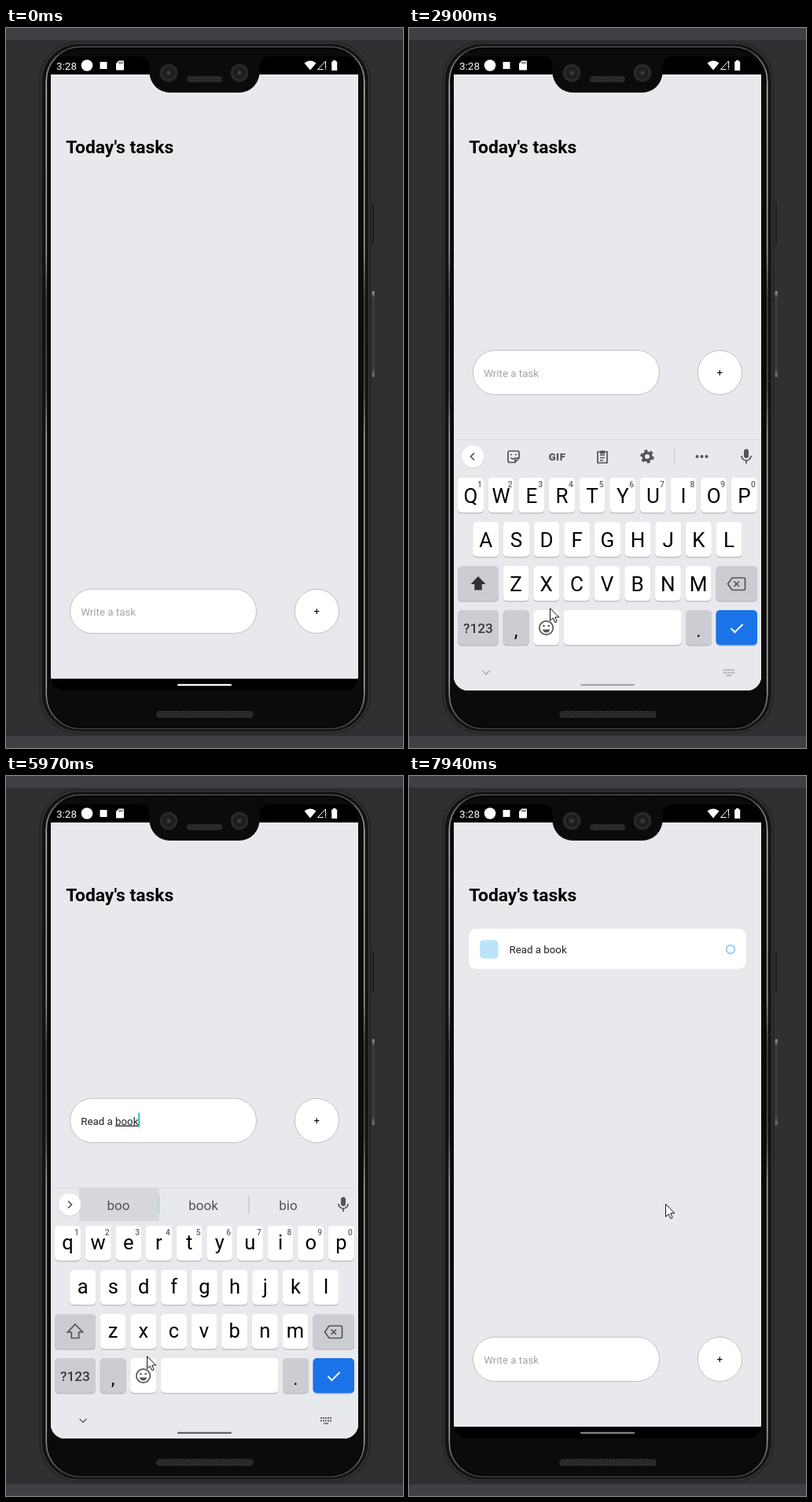
An HTML page for the animation above (8 s loop, 505 by 914 pixels).

```html
<!DOCTYPE html>
<html lang="en">
<head>
<meta charset="utf-8">
<title>Task list</title>
<style>
html, body { margin: 0; width: 505px; height: 914px; overflow: hidden; background: #2f3032; }
svg { display: block; font-family: Roboto, sans-serif; }
text { white-space: pre; }
.mid { text-anchor: middle; }
.icon { fill: none; stroke: #50545a; stroke-width: 1.7; }
</style>
</head>
<body>
<svg width="505" height="914" viewBox="0 0 505 914">
  <defs>
    <linearGradient id="metal" x2="0" y2="1">
      <stop offset="0" stop-color="#4a4b4d"/><stop offset=".06" stop-color="#b0b0b0"/>
      <stop offset=".3" stop-color="#9a9a9a"/><stop offset=".37" stop-color="#444"/>
      <stop offset=".5" stop-color="#505050"/><stop offset=".57" stop-color="#a0a0a0"/>
      <stop offset=".93" stop-color="#a4a4a4"/><stop offset="1" stop-color="#3c3c3c"/>
    </linearGradient>
    <linearGradient id="knob" x2="0" y2="1">
      <stop offset="0" stop-color="#999"/><stop offset=".08" stop-color="#3a3a3c"/>
      <stop offset=".9" stop-color="#3a3a3c"/><stop offset="1" stop-color="#777"/>
    </linearGradient>
    <radialGradient id="lens">
      <stop offset="0" stop-color="#4a4c4e"/><stop offset=".25" stop-color="#242627"/>
      <stop offset=".55" stop-color="#17191a"/><stop offset=".8" stop-color="#2b2d2e"/>
      <stop offset="1" stop-color="#1f2021"/>
    </radialGradient>
    <pattern id="mesh" width="3" height="3" patternUnits="userSpaceOnUse">
      <rect width="3" height="3" fill="#1c1c1c"/><path d="M0 0h1v1h-1zM1.5 1.5h1v1h-1z" fill="#565656"/>
    </pattern>
    <clipPath id="glass"><rect x="57" y="36" width="391" height="805" rx="18"/></clipPath>
  </defs>

  <rect width="505" height="914" fill="#2f3032"/>
  <rect width="505" height="15" fill="#3f4044"/>
  <rect y="899" width="505" height="15" fill="#3f4045"/>
  <rect y="912" width="505" height="2" fill="#493d45"/>

  <rect x="465.5" y="221" width="3" height="55" rx="1.5" fill="#1c1c1e" stroke="#3b3b3d" stroke-width=".7"/>
  <rect x="465.5" y="334" width="3.5" height="109" rx="1.5" fill="url(#knob)"/>
  <rect x="42" y="17" width="422.500" height="879" rx="50" fill="#242526"/>
  <rect x="45" y="19.500" width="416.500" height="874" rx="48" fill="#131314" stroke="#363738" stroke-width="1.500"/>
  <rect x="51.300" y="24" width="404.400" height="865.500" rx="43" fill="#050505" stroke="url(#metal)" stroke-width="1.700"/>
  <rect x="53.500" y="27" width="400" height="859.500" rx="40" fill="#0b0b0b"/>
  <rect x="191" y="867" width="124" height="9" rx="4.500" fill="url(#mesh)"/>

  <g clip-path="url(#glass)">
    <rect x="57" y="36" width="391" height="805"/>
    <rect x="57" y="59" width="391" height="767" fill="#e8e9ed"/>
    <text x="76.200" y="159" font-size="22.820" font-weight="700">Today's tasks</text>
    <g id="card">
      <rect x="76" y="194" width="353" height="51" rx="9.500" fill="#fff"/>
      <rect x="90" y="208.300" width="23.500" height="23.500" rx="5" fill="#bbe4fb"/>
      <text x="127.500" y="225" font-size="13.310" fill="#222">Read a book</text>
      <circle cx="409" cy="220" r="5.300" fill="none" stroke="#93d2f5" stroke-width="2"/>
    </g>
    <g id="form">
      <g fill="#fff" stroke="#bfbfc1">
        <rect x="81.500" y="712.200" width="237" height="56.300" rx="28"/>
        <circle cx="395.400" cy="740.400" r="28.100"/>
      </g>
      <text class="mid" x="395.300" y="745" font-size="13.310">+</text>
      <text id="entry" x="95.200" y="745.500" font-size="13.310"></text>
      <rect id="caret" y="730.500" width="2" height="18.500"/>
    </g>
    <rect id="under" x="57" y="522" width="391" height="319" fill="#fff"/>
    <g id="kb"></g>
    <g id="nav" fill="none" stroke-width="1.500">
      <path d="M93.500 816l4.500 4.500 4.500-4.500"/>
      <path d="M400 815h14M400 818.500h14" stroke-width="2" stroke-dasharray="2 1"/>
      <path d="M404 822h6"/>
    </g>
    <rect id="home" x="218" y="832.700" width="69" height="2.300" rx="1.100"/>
  </g>

  <path d="M170 36Q182.500 36 182.500 50V56a26 26 0 0 0 26 26H296.500a26 26 0 0 0 26-26V50Q322.500 36 335 36Z" fill="#0b0b0b"/>
  <circle cx="207" cy="57" r="11.500" fill="url(#lens)"/>
  <circle cx="297" cy="57" r="11.500" fill="url(#lens)"/>
  <rect x="230" y="61" width="45" height="8" rx="4" fill="url(#mesh)"/>

  <g fill="#fff">
    <text x="64" y="52.500" font-size="13.500">3:28</text>
    <circle cx="103" cy="47.500" r="7.300"/>
    <rect x="119.500" y="43" width="9" height="9"/>
    <path d="M143.500 41.500H149a1 1 0 0 1 1 1V52.500a1 1 0 0 1-1 1H141a1 1 0 0 1-1-1V45Z"/>
    <path d="M144 43v2.500M146 43v2.500M148 43v2.500" stroke="#000" stroke-width=".9"/>
    <path d="M379.500 44.500Q387 38.500 394.500 44.500L387 53.500Z"/>
    <path d="M406.500 47V42L396.500 52.500H403.500" fill="none" stroke="#fff"/>
    <path d="M406 47.500h1.200v3h-1.200zM406 51.500h1.200v1.200h-1.200z"/>
    <path d="M416 41h3.500v1.500h1.700v11.500h-7V42.500h1.800Z"/>
  </g>

  <circle id="tap" r="12" fill="#ff0" fill-opacity=".47"/>
  <path id="arrow" d="M.500 .500V16.500L4.200 13L6.700 18.700L9.200 17.600L6.800 12H11.800Z" fill="#fff" stroke="#111" stroke-linejoin="round"/>
</svg>

<script>
const $ = id => document.getElementById(id);
const show = (el, on) => el.setAttribute('display', on ? 'inline' : 'none');
const move = (el, x, y) => el.setAttribute('transform', `translate(${x} ${y})`);
const LOOP = 8000, PITCH = 38.65;

// Keyboard
const rect = (x, y, w, fill) =>
  `<rect x="${x}" y="${y + 1}" width="${w}" height="44.500" rx="5" fill="#b3b5ba"/>` +
  `<rect x="${x}" y="${y}" width="${w}" height="44.300" rx="5" fill="${fill}"/>`;
const label = (x, y, size, s, extra = '') =>
  `<text class="mid" x="${x}" y="${y}" font-size="${size}" ${extra}>${s}</text>`;
const GREY = '#cbcdd3';

function letters(row, x0, y) {
  return [...row].map((c, i) => {
    const x = x0 + i * PITCH;
    const hint = row.length === 10
      ? label(x + 28, y + 11.5, 10.3, (i + 1) % 10, 'font-weight="500" fill="#5f6368"') : '';
    return rect(x, y, 33, '#fff') + hint +
      label(x + 16.5, y + 32, 26, c.toUpperCase(), 'data-case="up"') +
      label(x + 16.5, y + 29.7, 25.5, c, 'data-case="low"');
  }).join('');
}

const SHIFT = 'd="M88 696L97.500 706H92.700V713.500H83.300V706H78.500Z"';
$('kb').innerHTML = `
  <rect x="57" y="522" width="391" height="322" fill="#e8e9ed"/>
  <rect x="57" y="522" width="391" height="1" fill="#dcdee2"/>
  <g id="sugg"></g>
  <circle cx="81" cy="545" r="14.300" fill="#d3d5d9"/>
  <circle cx="81" cy="544" r="14" fill="#fff"/>
  <path id="chev" class="icon"/>
  <g id="tools" class="icon">
    <path d="M128 537H138a2 2 0 0 1 2 2V546L135 551.500H128a2 2 0 0 1-2-2V539a2 2 0 0 1 2-2ZM140 546H137a2 2 0 0 0-2 2V551M129.500 545.500q3 3 6 0M129 541.500h2M135 541.500h2"/>
    ${label(188.5, 549, 13, 'GIF', 'font-weight="900" fill="#50545a" stroke="none" letter-spacing=".600"')}
    <path d="M240 538H252V552H240ZM243 542h6M243 545.500h6M243 549h4"/>
    <path d="M243 538.500h6" stroke-width="4"/>
    <circle cx="303" cy="544" r="4.800" stroke-width="3.500"/>
    <circle cx="303" cy="544" r="7.500" stroke-width="2.500" stroke-dasharray="3.927 3.927"/>
    <path d="M337.500 533V555" stroke="#c4c6ca" stroke-width="1"/>
    <path d="M366.500 544h.01M372.500 544h.01M378.500 544h.01" stroke-width="4" stroke-linecap="round"/>
  </g>
  <rect x="426" y="534.500" width="6" height="11.500" rx="3" fill="#50545a"/>
  <path class="icon" d="M423 543a6 6 0 0 0 12 0M429 549v4"/>
  ${letters('qwertyuiop', 62, 571)}
  ${letters('asdfghjkl', 81.3, 627)}
  ${letters('zxcvbnm', 119.6, 683)}
  ${rect(62, 683, 52, GREY)}${rect(390.500, 683, 52.500, GREY)}
  <path data-case="up" ${SHIFT} fill="#303134"/>
  <path data-case="low" ${SHIFT} class="icon" stroke-width="2"/>
  <path class="icon" d="M411 698H426a1.500 1.500 0 0 1 1.500 1.500V712a1.500 1.500 0 0 1-1.500 1.500H411L405.500 705.800ZM413.500 702.500l6.500 6.500M420 702.500l-6.500 6.500"/>
  ${rect(62, 739, 52, GREY)}${label(88, 768, 17.3, '?123', 'font-weight="500" fill="#37393d"')}
  ${rect(119.600, 739, 33, GREY)}${label(136, 773, 24, ',')}
  ${rect(158.200, 739, 33, '#fff')}
  <circle class="icon" cx="174.600" cy="761.500" r="8.700"/>
  <path d="M169.800 763.500h9.600q-1.500 4-4.800 4t-4.800-4Z" fill="#50545a"/>
  <path d="M171.500 759h.01M177.700 759h.01" stroke="#50545a" stroke-width="2.600" stroke-linecap="round"/>
  ${rect(196.900, 739, 149.600, '#fff')}
  ${rect(352, 739, 33, GREY)}${label(368.500, 773, 24, '.')}
  ${rect(390.500, 739, 52.500, '#1a73e8')}
  <path d="M409.500 762l5 5 10-10" fill="none" stroke="#fff" stroke-width="2"/>`;

// Suggestion strip
const bar = (x, color) => `<rect x="${x}" y="533" width="1" height="23" fill="${color}"/>`;
const books = `
  <path d="M326 547l9 5 9-4v-4l-10-3Z" fill="#c8322c"/><path d="M335 551l8.500-3.500" stroke="#eee" stroke-width="2"/>
  <path d="M325 542l9 5 9-4v-3l-9-3Z" fill="#2c6f94"/><path d="M334 546l8.500-3.500" stroke="#eee" stroke-width="2"/>
  <path d="M326 537l9 5 9-4-9-4Z" fill="#d5443b"/><path d="M326 537v3l9 4 8-3.500" fill="none" stroke="#a42a27"/>`;
const openBook = `
  <path d="M376 538V552H396V538" fill="#5a9cc4"/>
  <path d="M377.500 536q5-1 8.500 2 3.500-3 8.500-2v14q-5-1-8.500 1.500-3.500-2.500-8.500-1.500Z" fill="#fafafa" stroke="#bcc3c8" stroke-width=".7"/>
  <path d="M386 538v13M379.500 540h4M379.500 543h4M379.500 546h4M388.500 540h4M388.500 543h4M388.500 546h4" stroke="#9aa3a9" stroke-width=".8"/>`;

function strip(words, marked) {
  const text = words.map((w, i) => label(143 + i * 108, 550.5, 17, w, 'fill="#50535a"')).join('');
  const extra = words.length < 3 ? bar(359, '#c2c4c8') + books + openBook : '';
  return (marked ? '<rect x="93" y="523" width="101.500" height="42" fill="#d6d8db"/>' : '') +
    bar(194, '#9fcabd') + bar(308.5, '#b9bbbf') + text + extra;
}

// Timelines: [start, value]
const typed = [[0, ''], [4230, 'R'], [4440, 'Re'], [4580, 'Rea'], [4770, 'Read'], [4970, 'Read '],
  [5100, 'Read a'], [5240, 'Read a '], [5430, 'Read a b'], [5600, 'Read a bo'], [5770, 'Read a boo'],
  [5970, 'Read a book'], [7596, '']];
const hints = [[0, ''], [4370, 'R Really Right'], [4510, 'Re Read Really'], [4650, 'Rea Read Ready'],
  [4840, 'Read Ready Reading'], [4970, '-the this it'], [5180, 'a an at'], [5330, '-lot book good'],
  [5510, 'b book be'], [5690, 'bo book box'], [5970, 'boo book bio'], [6240, 'book bookshelf']];
const blink = [[0, 0], [1860, 1], [2480, 0], [2970, 1], [3530, 0], [4030, 1], [6570, 0], [7050, 1], [7596, 0]];
const slide = [[0, 330], [2060, 120], [2130, 22], [2200, 0], [7596, 25], [7665, 95], [7734, 190], [7802, 275], [7871, 330]];
const fades = [2340, 2480, 2690, 2900, 3250, 3530, 3880];
const glide = [[179, 736], [186, 690], [205, 635], [240, 570], [290, 500], [350, 440], [410, 398],
  [450, 387], [432, 410], [410, 432], [401, 438]];
const at = (line, t) => line.reduce((v, [start, value]) => t >= start ? value : v, line[0][1]);
const mix = (a, b, p) => a + (b - a) * p;

function pointer(t) {
  if (t < 440) return null;
  if (t < 6570) {
    const p = Math.min(7, Math.floor((t - 440) / 68.57 + .01)) / 7, e = 1 - (1 - p) ** 1.5;
    return [mix(366, 179, e), mix(880, 736, e)];
  }
  if (t < 7527) return glide[Math.min(10, 1 + Math.floor((t - 6570) / 76.67 + .01))];
  const p = Math.min(1, Math.max(0, Math.floor((t - 7390) / 68.75 + .01) - 2) / 6);
  return [mix(401, 326, p), mix(438, 543, p)];
}

let lastHint = null, lastText = null, width = 0;

function setText(s) {
  if (s === lastText) return;
  lastText = s;
  const cut = s.length > 1 ? s.lastIndexOf(' ') + 1 : s.length;
  const el = $('entry');
  el.innerHTML = s
    ? `<tspan>${s.slice(0, cut)}</tspan><tspan text-decoration="underline">${s.slice(cut)}</tspan>`
    : 'Write a task';
  el.setAttribute('fill', s ? '#202124' : '#a2a2a4');
  width = s ? el.getComputedTextLength() : 0;
}

function setHint(s) {
  if (s === lastHint) return;
  lastHint = s;
  $('sugg').innerHTML = s ? strip(s.replace('-', '').split(' '), s[0] !== '-') : '';
  show($('tools'), !s);
  $('chev').setAttribute('d', s ? 'M79 539.500l4.500 4.500-4.500 4.500' : 'M83 539.500l-4.500 4.500 4.500 4.500');
}

function draw(t) {
  const off = at(slide, t), open = t >= 2060 && t < 7596;
  setText(at(typed, t));
  setHint(at(hints, t));
  const upper = t < 4300;
  document.querySelectorAll('[data-case]').forEach(el => show(el, (el.dataset.case === 'up') === upper));

  move($('form'), 0, open ? -303 : 0);
  const caret = $('caret');
  show(caret, at(blink, t));
  caret.setAttribute('x', 95 + width);
  caret.setAttribute('fill', t >= 2060 && t < 2480 ? '#3d8fd1' : '#2bbfb0');

  show($('card'), t >= 7596);
  show($('under'), open);
  show($('kb'), off < 330);
  move($('kb'), 0, off);

  const p = fades.filter(f => t >= f).length / fades.length;
  const tone = `rgb(${mix(255, 95, p)},${mix(255, 99, p)},${mix(255, 104, p)})`;
  show($('nav'), open);
  $('nav').setAttribute('stroke', tone);
  $('home').setAttribute('fill', open ? tone : t < 2060 ? '#fff' : t < 7871 ? '#707378' : '#858585');

  const pos = pointer(t);
  show($('arrow'), pos);
  show($('tap'), (t >= 1710 && t < 1860) || (t >= 7390 && t < 7527));
  if (pos) {
    move($('arrow'), ...pos);
    move($('tap'), ...pos);
  }
}

const begin = performance.now();
function tick() {
  draw((performance.now() - begin) % LOOP);
  requestAnimationFrame(tick);
}
tick();
</script>
</body>
</html>
```
